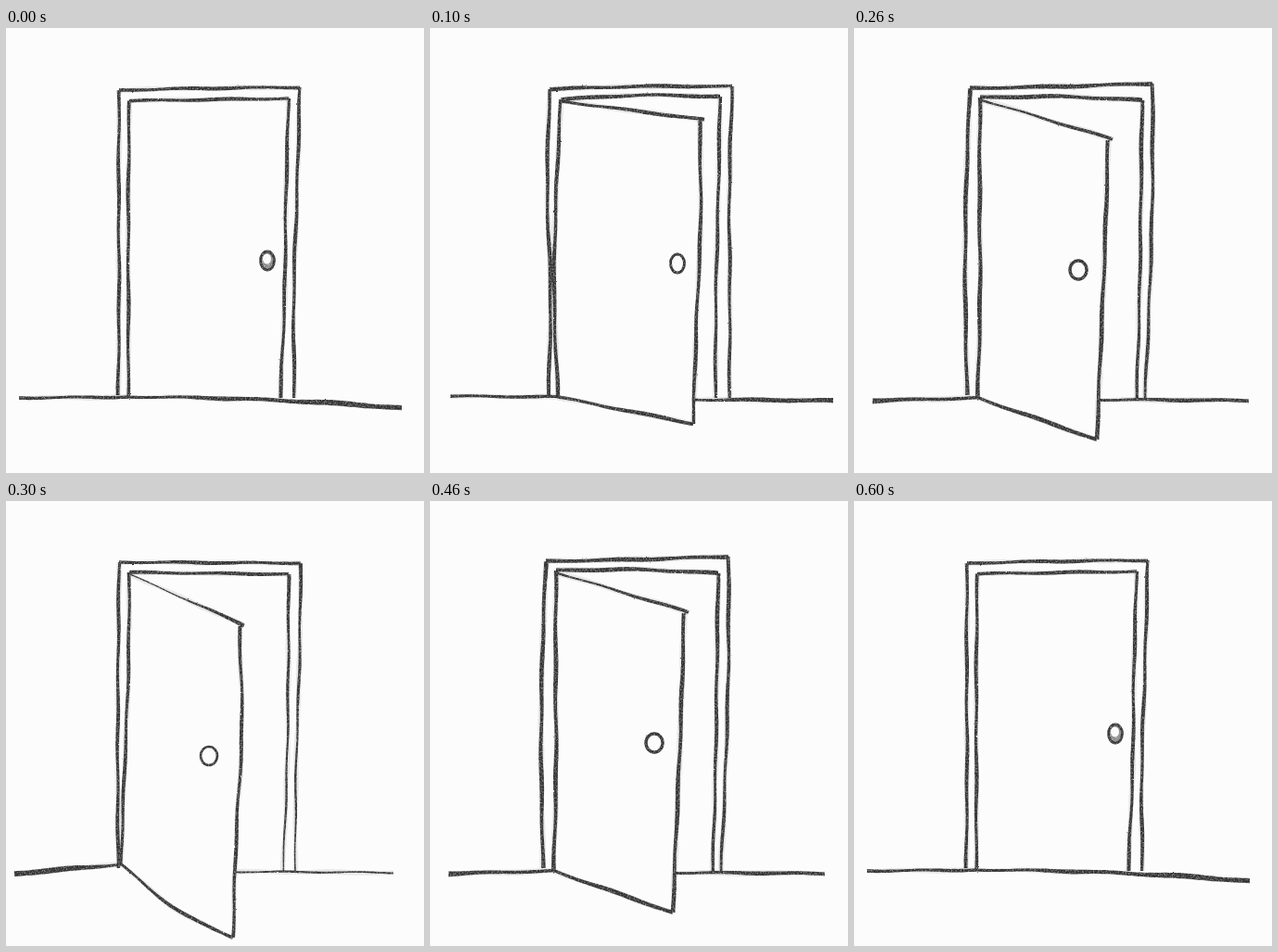
Animation of 451x480 px, one loop 700 ms. Source, as an HTML page:

```html
<!DOCTYPE html>
<html lang="en">
<head>
<meta charset="utf-8">
<title>Door opening and closing</title>
<style>
html, body { margin: 0; width: 100%; height: 100%; overflow: hidden; background: #fcfcfc; }
svg { display: block; width: 100%; height: 100%; }
</style>
</head>
<body>
<svg id="stage" viewBox="0 0 451 480">
  <defs>
    <filter id="pencil" filterUnits="userSpaceOnUse" x="0" y="0" width="451" height="480" color-interpolation-filters="sRGB">
      <feTurbulence type="fractalNoise" baseFrequency="0.25" numOctaves="2" seed="4" result="noise"/>
      <feDisplacementMap in="SourceGraphic" in2="noise" scale="1.6" xChannelSelector="R" yChannelSelector="G"/>
      <feGaussianBlur stdDeviation="0.4" result="soft"/>
      <feTurbulence type="fractalNoise" baseFrequency="0.6" numOctaves="2" seed="9"/>
      <feColorMatrix values="0 0 0 0 0  0 0 0 0 0  0 0 0 0 0  1.2 0 0 0 0.32" result="grain"/>
      <feComposite in="soft" in2="grain" operator="in"/>
    </filter>
  </defs>
</svg>
<script>
const FRAME_MS = 100;
const SEQUENCE = [0, 1, 2, 3, 2, 1, 0];
const FOOT = 398;
const INK = '#333';
const NS = 'http://www.w3.org/2000/svg';
const stage = document.getElementById('stage');

// Jambs and the door edge list x from top to bottom; lintels and the door's
// bottom list y from left to right. Floor ends are x, y, line width.
const poses = [
  {
    weight: 3.6,
    outer: { left: [122, 121.5, 122, 121], top: [67, 65, 64], right: [317, 314, 310.5, 311] },
    inner: { left: [133, 132, 132, 132], top: [78.5, 76], right: [305, 302, 300.5, 296] },
    bottom: [398],
    floor: [[14, 399, 3.5], [427, 410, 6]],
    knob: [282, 251, 7.5]
  },
  {
    weight: 3.8,
    outer: { left: [129, 126.5, 130, 128], top: [66, 63, 63], right: [326, 323, 323.5, 323] },
    inner: { left: [141, 136, 134, 138], top: [77, 72.5, 74], right: [313, 311, 308.5, 308] },
    door: { edge: [291, 292, 287.5, 284], top: 99 },
    bottom: [398, 427],
    floor: [[22, 397, 3.5], [435, 402, 5.5]],
    knob: [267, 254, 7.5]
  },
  {
    weight: 4.2,
    outer: { left: [125, 121, 120, 122], top: [65, 63, 60], right: [322, 322, 319, 314] },
    inner: { left: [136, 135.5, 136, 133.5], top: [75, 74, 78], right: [311, 309.5, 308, 305] },
    door: { edge: [274, 271, 266.5, 262], top: 120 },
    bottom: [399, 444],
    floor: [[20, 402, 5], [426, 402, 4.5]],
    knob: [242, 261, 9]
  },
  {
    weight: 3.5,
    outer: { left: [122, 121, 120.5, 121], top: [66, 67], right: [318, 316.5, 313, 312] },
    inner: { left: [133, 132, 128, 124], top: [77, 79], right: [305, 304.5, 303, 299] },
    door: { edge: [252, 254.5, 248.5, 245], top: 134 },
    bottom: [392, 441, 471],
    floor: [[9, 402, 7], [418, 401, 2]],
    knob: [219, 275, 9]
  }
];

function seeded(seed) {
  return () => (seed = seed * 16807 % 2147483647) / 2147483647;
}
const random = seeded(4711);
const lerp = (a, b, t) => a + (b - a) * t;
const last = list => list[list.length - 1];

// Smooth curve through evenly spaced values.
function along(values, t) {
  const end = values.length - 1;
  const i = Math.min(Math.floor(t * end), end - 1);
  const f = t * end - i;
  const b = values[i], c = values[i + 1];
  const a = i > 0 ? values[i - 1] : 2 * b - c;
  const d = i + 2 <= end ? values[i + 2] : 2 * c - b;
  return b + f / 2 * (c - a + f * (2 * a - 5 * b + 4 * c - d + f * (3 * (b - c) + d - a)));
}

const upright = (xs, y0, y1) => t => [along(xs, t), lerp(y0, y1, t)];
const across = (x0, x1, ys) => t => [lerp(x0, x1, t), along(ys, t)];

function add(parent, tag, attrs) {
  const node = document.createElementNS(NS, tag);
  for (const key in attrs) node.setAttribute(key, attrs[key]);
  return parent.appendChild(node);
}

// Outline of a wavering pencil line that follows curve(t) with width(t).
function outline(curve, width) {
  const [x0, y0] = curve(0), [x1, y1] = curve(1);
  const length = Math.hypot(x1 - x0, y1 - y0);
  const steps = Math.ceil(length / 4);
  const phase = random() * 6.28, swell = random() * 6.28;
  const left = [], right = [];
  for (let i = 0; i <= steps; i++) {
    const t = i / steps, s = t * length;
    const [x, y] = curve(t);
    const nx = (y0 - y1) / length, ny = (x1 - x0) / length;
    const shift = 0.5 * Math.sin(s / 13 + phase);
    const half = width(t) / 2 * (1 + 0.14 * Math.sin(s / 19 + swell) + 0.1 * (random() - 0.5));
    left.push([x + nx * (shift + half), y + ny * (shift + half)]);
    right.unshift([x + nx * (shift - half), y + ny * (shift - half)]);
  }
  return 'M' + left.concat(right).map(p => p.map(v => v.toFixed(1))).join('L') + 'Z';
}

function drawPose({ weight, outer, inner, door, bottom, floor, knob }, swing) {
  const group = add(stage, 'g', { visibility: 'hidden' });
  const ink = add(group, 'g', { filter: 'url(#pencil)', fill: INK });
  // A stroke is one firm line over a faint construction line.
  const stroke = (curve, from = weight, to = from, ease = 1) => {
    add(ink, 'path', { d: outline(curve, () => weight + 1.5), opacity: 0.1 });
    add(ink, 'path', { d: outline(curve, t => lerp(from, to, t ** ease)) });
  };

  const hinge = [last(inner.left), bottom[0]];
  for (const frame of [outer, inner]) {
    const foot = frame === inner ? hinge[1] : FOOT - 2;
    stroke(upright(frame.left, frame.top[0], foot));
    stroke(across(frame.left[0], frame.right[0], frame.top));
    stroke(upright(frame.right, last(frame.top), FOOT + 1), weight, weight - 0.6 * swing);
  }

  if (door) {
    const tip = last(bottom);
    stroke(across(inner.left[0], door.edge[0] + 5, [inner.top[0] + 2, door.top]), 4.4 - swing, 4.5, 3);
    stroke(upright(door.edge, door.top + 1, tip));
    stroke(across(hinge[0], last(door.edge), bottom), weight - 0.5, weight + 0.4);
  }

  const [[leftX, leftY, leftWidth], [rightX, rightY, rightWidth]] = floor;
  const [startX, startY] = door ? [last(door.edge), rightY - 1] : hinge;
  stroke(across(leftX, hinge[0], [leftY, hinge[1]]), leftWidth, 3);
  stroke(t => [lerp(startX, rightX, t), lerp(startY, rightY, t * t)], Math.min(3, rightWidth), rightWidth);

  const [cx, cy, rx] = knob;
  add(ink, 'ellipse', {
    cx, cy, rx, ry: 10, fill: door ? 'none' : '#888', stroke: INK, 'stroke-width': weight - 0.8
  });
  if (!door) add(group, 'ellipse', { cx: cx - 0.5, cy: cy - 2, rx: 4.5, ry: 5.5, fill: '#fafafa' });
  return group;
}

const groups = poses.map(drawPose);

function render(ms) {
  const current = SEQUENCE[Math.floor(ms / FRAME_MS) % SEQUENCE.length];
  groups.forEach((group, i) => group.setAttribute('visibility', i === current ? 'visible' : 'hidden'));
}

const start = performance.now();
function tick() {
  render(performance.now() - start);
  requestAnimationFrame(tick);
}
tick();
</script>
</body>
</html>
```
